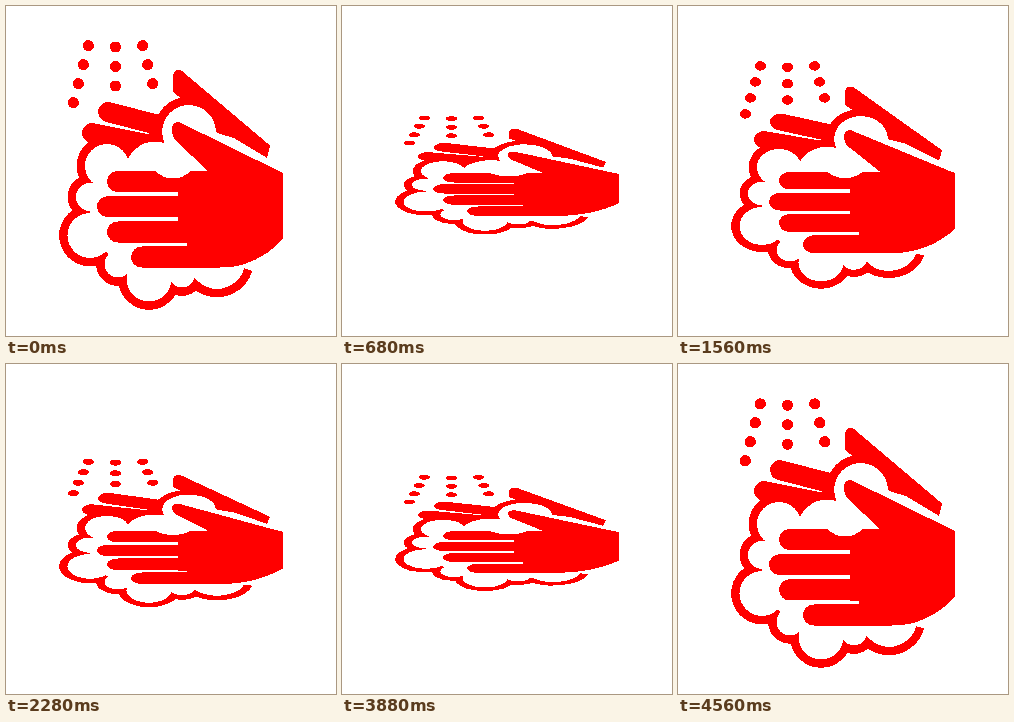
Recreate the animation shown at these times as an HTML page with a canvas. Size 330 px wide and 330 px high, loop 4600 ms.

```html
<!DOCTYPE html>
<html lang="en">
<head>
<meta charset="utf-8">
<title>Hand washing</title>
<style>
  html, body { margin: 0; width: 100%; height: 100%; overflow: hidden; background: #fff; }
  canvas { display: block; width: 330px; height: 330px; }
</style>
</head>
<body>
<canvas id="stage" width="330" height="330"></canvas>
<script>
const ctx = document.getElementById('stage').getContext('2d', { willReadFrequently: true });
const SIZE = 330, RED = '#ff0000', WHITE = '#ffffff';
const LOOP = 4600, STEP = 50, MID = 169, LOW = 0.43, RIM = 8.4;

// Height of the drawing at key times: a quick squeeze, a rest, a slow squeeze
const KEYS = [[0, 1], [640, LOW], [1240, 1], [1325, 1], [3945, LOW], [LOOP, 1]];

// Foam outline, anticlockwise from the top: x, y, inner radius
const FOAM = [
  [149, 165, 29.5], [101, 160, 22], [84, 191, 14], [84, 229.5, 22.5],
  [112, 258, 13.5], [143, 273, 22.5], [176, 268.5, 13]
];

function bezier(s, a, b) {
  const r = 1 - s;
  return 3 * a * s * r * r + 3 * b * s * s * r + s * s * s;
}

function ease(x) {
  let lo = 0, hi = 1;
  for (let i = 0; i < 24; i++) {
    const m = (lo + hi) / 2;
    if (bezier(m, 0.12, 0) < x) lo = m; else hi = m;
  }
  return bezier(lo, 0.08, 1);
}

function scaleAt(t) {
  const i = KEYS.findIndex(key => t < key[0]);
  const [start, from] = KEYS[i - 1], [end, to] = KEYS[i];
  return from + (to - from) * ease((t - start) / (end - start));
}

function disc(x, y, r, color, turn = Math.PI * 2) {
  ctx.fillStyle = color;
  ctx.beginPath();
  ctx.arc(x, y, r, 0, turn);
  ctx.fill();
}

function poly(points, color) {
  ctx.fillStyle = color;
  ctx.beginPath();
  points.forEach(([x, y]) => ctx.lineTo(x, y));
  ctx.fill();
}

// Round-ended bar, also used for fingers
function bar(x1, y1, x2, y2, width) {
  ctx.strokeStyle = RED;
  ctx.lineWidth = width;
  ctx.lineCap = 'round';
  ctx.beginPath();
  ctx.moveTo(x1, y1);
  ctx.lineTo(x2, y2);
  ctx.stroke();
}

// White bubble with a red rim along part of it
function bubble(x, y, r, from, to) {
  disc(x, y, r, WHITE);
  ctx.strokeStyle = RED;
  ctx.lineWidth = RIM;
  ctx.lineCap = 'butt';
  ctx.beginPath();
  ctx.arc(x, y, r + RIM / 2, from, to);
  ctx.stroke();
}

function drops() {
  for (let side = -1; side <= 1; side++) {
    const rows = side < 0 ? 4 : 3;
    for (let row = 0; row < rows; row++) {
      const drop = side ? 39.6 + 19 * row : 41 + 19.5 * row;
      disc(109.5 + side * (27.2 + 5 * row), drop, 5.6, RED);
    }
  }
}

function backHand() {
  bar(102, 106, 152, 119, 20);
  bar(86, 127, 141, 138, 20);
  ctx.fillStyle = RED;
  ctx.beginPath();
  ctx.moveTo(167, 86);
  ctx.lineTo(167, 71);
  ctx.quadraticCurveTo(168, 61, 176, 65);
  ctx.lineTo(264, 139.5);
  ctx.lineTo(261, 152);
  ctx.lineTo(228, 132);
  ctx.lineTo(211, 127);
  ctx.lineTo(185, 100);
  ctx.fill();
}

function foam() {
  FOAM.forEach(([x, y, r]) => disc(x, y, r + RIM, RED));
  bubble(211, 254.5, 28.3, 0.28, 2.4);
  bubble(183, 126, 27, 2.95, 6.23);
  FOAM.forEach(([x, y, r]) => disc(x, y, r, WHITE));
  poly([...FOAM, [211, 254], [240, 190], [183, 140]], WHITE);
}

function frontHand() {
  [101, 91, 101, 125].forEach((tip, i) => {
    const y = 175.5 + 25.2 * i;
    bar(tip + 10.5, y, 195, y, 21);
  });
  ctx.fillStyle = RED;
  ctx.beginPath();
  ctx.moveTo(172, 165);
  ctx.lineTo(277, 165);
  ctx.lineTo(277, 233);
  ctx.quadraticCurveTo(250, 261.6, 214, 261.6);
  ctx.lineTo(181, 261.6);
  ctx.lineTo(181, 237);
  ctx.lineTo(172, 237);
  ctx.fill();
  disc(167, 148, 24.5, WHITE, Math.PI);
  thumb();
}

function thumb() {
  // Clear the palm corner above the slanted edge
  poly([[265, 161], [277, 161], [277, 167]], WHITE);
  ctx.fillStyle = RED;
  ctx.beginPath();
  ctx.moveTo(203, 166);
  ctx.lineTo(169, 134);
  ctx.quadraticCurveTo(166, 130, 166, 122);
  ctx.quadraticCurveTo(167, 115, 173, 116);
  ctx.lineTo(277, 167);
  ctx.fill();
}

// Snap every pixel to plain red or white for hard edges
function harden() {
  const image = ctx.getImageData(0, 0, SIZE, SIZE), px = image.data;
  for (let i = 0; i < px.length; i += 4) {
    px[i + 1] = px[i + 2] = px[i + 1] < 128 ? 0 : 255;
  }
  ctx.putImageData(image, 0, 0);
}

function draw(t) {
  ctx.setTransform(1, 0, 0, 1, 0, 0);
  ctx.fillStyle = WHITE;
  ctx.fillRect(0, 0, SIZE, SIZE);
  const s = scaleAt(t);
  ctx.setTransform(1, 0, 0, s, 0, MID * (1 - s));
  drops();
  backHand();
  foam();
  frontHand();
  harden();
}

const begin = performance.now();

function tick() {
  const t = (performance.now() - begin) % LOOP;
  draw(Math.floor(t / STEP) * STEP);
  requestAnimationFrame(tick);
}

tick();
</script>
</body>
</html>
```
